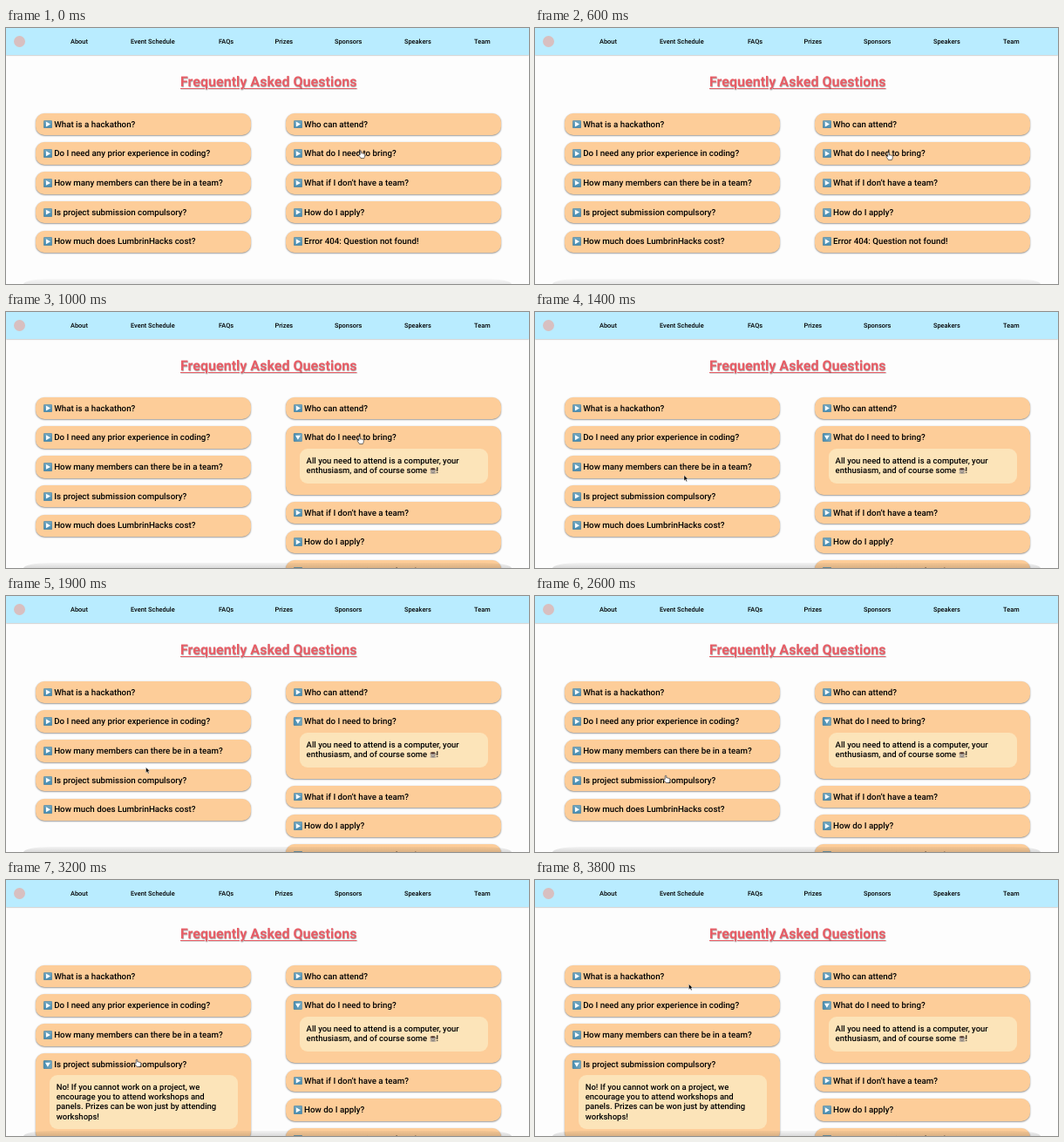
An HTML page for the animation above (3.9 s loop, 600 by 294 pixels).

```html
<!DOCTYPE html>
<html lang="en">
<head>
<meta charset="utf-8">
<title>Frequently Asked Questions</title>
<style>
  html, body { margin: 0; width: 100%; height: 100%; overflow: hidden; }
  body { position: relative; background: #fdfdfd; color: #000; font-family: Roboto, sans-serif; font-weight: 500; text-rendering: geometricPrecision; }
  nav { position: absolute; inset: 0 0 auto; height: 31px; background: #b9ecff; box-shadow: 0 .5px 1.5px #0006; font-size: 7.4px; line-height: 31px; }
  nav span { position: absolute; white-space: nowrap; }
  .logo { position: absolute; left: 9px; top: 8.5px; width: 13px; height: 13px; border-radius: 50%; background: #d8bfc0; }
  h1 { position: absolute; left: 200px; top: 52px; margin: 0; font-size: 16.05px; line-height: 20px; white-space: nowrap; color: #e85d66;
    text-decoration: underline 1.2px; text-underline-offset: 1.8px; text-shadow: .4px .5px 1px #0005; }
  .column { position: absolute; top: 97.8px; width: 247px; }
  .card { margin-bottom: 8.2px; border-radius: 10px; background: #fdcd99; box-shadow: 0 .8px 1.8px #0007; }
  .question { display: flex; align-items: center; height: 25.5px; padding-left: 9px; font-size: 9.75px; white-space: nowrap; }
  .question span { position: relative; top: .7px; }
  .icon { width: 9.8px; height: 9.8px; margin-right: 2.2px; border-radius: 1.5px; background: linear-gradient(#76a9c0, #438bb1); box-shadow: inset 0 0 0 .6px #6d8b98; }
  .icon::before { content: ""; display: block; height: 100%; background: #fff; clip-path: polygon(28% 20%, 28% 80%, 80% 50%); }
  .answer { display: none; width: 200px; margin-left: 15.5px; padding: 8.6px 8px; border-radius: 9px; background: #fce4b9; font-size: 9.5px; line-height: 11.2px; white-space: nowrap; }
  .open .answer { display: block; }
  .open { padding-bottom: 13px; }
  .open .icon { transform: rotate(90deg); }
  .cup { width: 8px; height: 8px; vertical-align: -1px; }
  .shade { position: absolute; inset: 288px 20px 0; border-radius: 32px 32px 0 0 / 6px 6px 0 0; background: linear-gradient(#0000000a, #00000024); }
  #cursor { position: absolute; left: 0; top: 0; width: 12px; height: 14px; overflow: visible; }
</style>
</head>
<body>
<nav id="nav"><i class="logo"></i></nav>
<h1>Frequently Asked Questions</h1>
<div class="column" id="left" style="left:34.2px"></div>
<div class="column" id="right" style="left:321.1px"></div>
<div class="shade" id="shade"></div>
<svg id="cursor" stroke-linejoin="round">
  <path id="arrow" d="M0 0V6.2L1.5 4.9L2.6 7.2L3.6 6.7L2.5 4.5H4.4Z" fill="#000" stroke="#fff" stroke-width=".4"/>
  <path id="hand" d="M-.8 .6Q0-.6 .8 .6V3Q1.7 2.4 2.3 3.2Q3.2 2.7 3.7 3.5Q4.8 3.3 4.8 4.4V6Q4.4 7.2 3.8 8.6H0Q-.9 6.8-2.6 5Q-2.6 3.6-.8 4.6Z" fill="#fff" stroke="#333" stroke-width=".7"/>
</svg>
<script>
const $ = id => document.getElementById(id);
const LOOP = 3900, STEP = 100, OPEN_RIGHT = 700, OPEN_LEFT = 2700;

const menu = [["About", 74], ["Event Schedule", 143], ["FAQs", 244], ["Prizes", 308.5], ["Sponsors", 377], ["Speakers", 457], ["Team", 537]];
for (const [label, x] of menu) $("nav").innerHTML += `<span style="left:${x}px">${label}</span>`;

const cup = `<svg class="cup" viewBox="0 0 8 8"><ellipse cx="4" cy="6.8" rx="3.6" ry=".9" fill="#9c958e"/><path d="M1 2H6.4Q6.3 6.5 3.7 6.5T1 2Z" fill="#b5aca4" stroke="#6d655f" stroke-width=".5"/><path d="M6.2 3Q8 2.8 7.3 4.2T5.8 5" fill="none" stroke="#77706a" stroke-width=".6"/><ellipse cx="3.7" cy="2.3" rx="2.6" ry="1.1" fill="#4d3026"/></svg>`;

function fill(column, entries) {
  column.innerHTML = entries.map(([question, answer = ""]) =>
    `<div class="card"><div class="question"><i class="icon"></i><span>${question}</span></div><div class="answer">${answer}</div></div>`).join("");
}
fill($("left"), [
  ["What is a hackathon?"],
  ["Do I need any prior experience in coding?"],
  ["How many members can there be in a team?"],
  ["Is project submission compulsory?", "No! If you cannot work on a project, we<br>encourage you to attend workshops and<br>panels. Prizes can be won just by attending<br>workshops!"],
  ["How much does LumbrinHacks cost?"]
]);
fill($("right"), [
  ["Who can attend?"],
  ["What do I need to bring?", `All you need to attend is a computer, your<br>enthusiasm, and of course some ${cup}!`],
  ["What if I don’t have a team?"],
  ["How do I apply?"],
  ["Error 404: Question not found!"]
]);

// Pointer path: time, x, y
const path = [[0, 407, 141], [600, 405.5, 143], [1100, 405.5, 143], [1200, 399, 145], [1400, 171, 187.5],
  [1600, 171, 187.5], [2200, 150, 206], [3300, 150, 206], [3800, 176.5, 119.5], [LOOP, 176.5, 119.5]];

function pointerAt(t) {
  const i = path.findIndex(p => p[0] > t);
  const [t0, x0, y0] = path[i - 1], [t1, x1, y1] = path[i];
  const k = (t - t0) / (t1 - t0), e = k * k * (3 - 2 * k);
  return [x0 + (x1 - x0) * e, y0 + (y1 - y0) * e];
}

const leftCard = $("left").children[3], rightCard = $("right").children[1];

function draw(now) {
  const t = Math.floor(now % LOOP / STEP) * STEP;
  const [x, y] = pointerAt(t);
  leftCard.classList.toggle("open", t >= OPEN_LEFT);
  rightCard.classList.toggle("open", t >= OPEN_RIGHT);
  $("shade").style.opacity = t < OPEN_RIGHT ? 0.6 : 1;

  // The hand shows over a question, the arrow elsewhere
  const row = (y - 98) % 33.7;
  const onCard = (x > 34 && x < 282) || (x > 321 && x < 569);
  const hand = onCard && row > 4 && row < 21;
  $("hand").style.display = hand ? "" : "none";
  $("arrow").style.display = hand ? "none" : "";
  $("cursor").style.transform = `translate(${x}px, ${y}px)`;
}

const start = performance.now();
function tick() {
  draw(performance.now() - start);
  requestAnimationFrame(tick);
}
tick();
</script>
</body>
</html>
```
